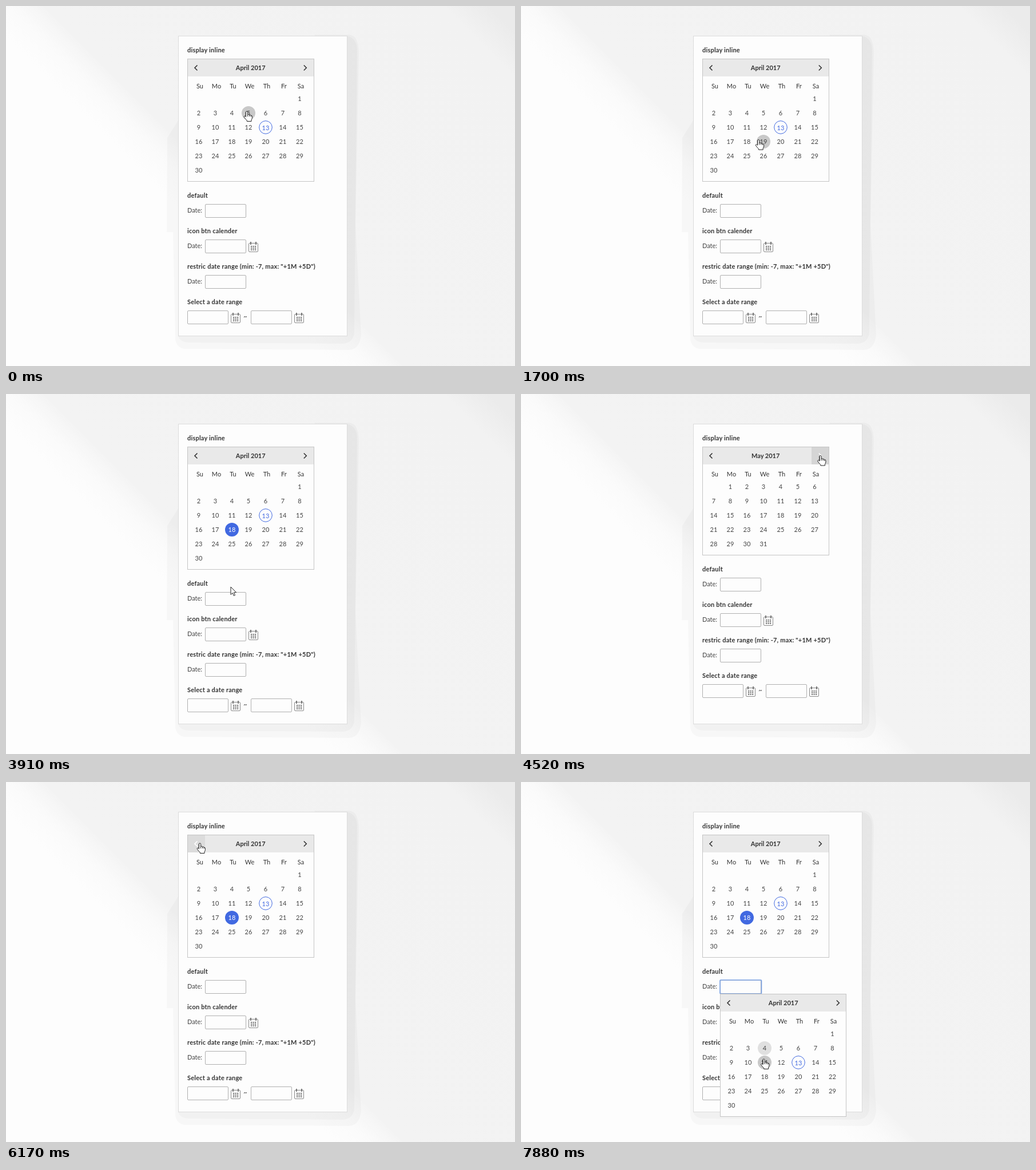
Recreate the animation shown at these times as an HTML page. Size 890 by 629 pixels, loop 8000 ms.

```html
<!DOCTYPE html>
<html lang="en">
<head>
<meta charset="utf-8">
<title>Date picker</title>
<style>
html, body { margin: 0; width: 100%; height: 100%; overflow: hidden; background: #f3f3f3; }
svg { display: block; width: 890px; height: 629px; }
text { font: 400 11px Lato, "Open Sans", sans-serif; fill: #444; white-space: pre; }
.head { font-weight: 700; fill: #333; letter-spacing: .2px; }
.title { font-weight: 700; fill: #333; text-anchor: middle; }
.mid { text-anchor: middle; }
.name { text-anchor: middle; fill: #333; }
.input { fill: #fdfdfd; stroke: #b0b0b0; }
.chev { fill: none; stroke: #333; stroke-width: 1.6; }
.cursor { fill: #fff; stroke: #222; stroke-width: 1; stroke-linejoin: round; }
</style>
</head>
<body>
<svg id="stage" viewBox="0 0 890 629" xmlns="http://www.w3.org/2000/svg">
  <defs>
    <linearGradient id="bg" gradientUnits="userSpaceOnUse" x1="0" y1="0" x2="445" y2="-445">
      <stop offset="0" stop-color="#f8f8f8"/>
      <stop offset=".075" stop-color="#f3f3f3"/>
      <stop offset=".86" stop-color="#f2f2f2"/>
      <stop offset=".95" stop-color="#ebebeb"/>
    </linearGradient>
    <linearGradient id="light" gradientUnits="userSpaceOnUse" x1="-27" y1="27" x2="35" y2="-35">
      <stop offset="0" stop-color="#fdfdfd"/>
      <stop offset="1" stop-color="#fdfdfd" stop-opacity="0"/>
    </linearGradient>
  </defs>
  <rect width="890" height="629" fill="url(#bg)"/>
  <rect width="890" height="629" fill="url(#light)"/>
  <g fill="#000">
    <path fill-opacity=".022" d="M301 200L282 230L281 395H292L296 582Q298 597 312 599L600 601Q618 600 621 575L611 380L617 80Q616 51 600 50H540V400H301Z"/>
    <path fill-opacity=".025" d="M301 560V577Q305 588 320 588L590 590Q608 588 609 570L614 75Q613 56 596 52V577Z"/>
  </g>
  <rect x="301.5" y="52.5" width="295" height="524" fill="#fdfdfd" stroke="#dcdcdc"/>
</svg>
<script>
const NS = 'http://www.w3.org/2000/svg';
const stage = document.getElementById('stage');
const LOOP = 8000, FADE = 200;
const COLS = [337, 366, 395, 424, 454, 484, 513.5];
const BLUE = '#4169e1';

function add(parent, tag, attrs, text) {
  const el = document.createElementNS(NS, tag);
  for (const key in attrs) el.setAttribute(key, attrs[key]);
  if (text !== undefined) el.textContent = text;
  parent.appendChild(el);
  return el;
}

const write = (g, x, y, cls, s) => add(g, 'text', { x, y, class: cls }, s);

function arrowButton(g, x, d) {
  const fill = add(g, 'rect', { x, y: 93, width: 30, height: 30, fill: '#c8c8c8', opacity: 0 });
  const chev = add(g, 'path', { d, class: 'chev' });
  return a => {
    fill.setAttribute('opacity', a);
    chev.style.stroke = a > 0.25 ? '#fff' : '#333';
  };
}

function calendar(parent, title, first, count, width, today) {
  const g = add(parent, 'g', {});
  const rows = Math.ceil((first + count) / 7);
  add(g, 'rect', { x: 317.5, y: 92.5, width, height: 64 + rows * 25, fill: '#fdfdfd', stroke: '#c5c5c5' });
  add(g, 'rect', { x: 318, y: 93, width: width - 1, height: 30, fill: '#e9e9e9' });
  const prev = arrowButton(g, 318, 'M334.5 103.5L330 108L334.5 112.5');
  const next = arrowButton(g, 508, 'M520.8 103.5L525.3 108L520.8 112.5');
  write(g, 427.7, 112, 'title', title);
  ['Su', 'Mo', 'Tu', 'We', 'Th', 'Fr', 'Sa'].forEach((s, i) => write(g, COLS[i] + 2, 144, 'name', s));
  const days = {};
  for (let d = 1; d <= count; d++) {
    const cell = first + d - 1, x = COLS[cell % 7], y = 162 + 25 * Math.floor(cell / 7);
    const isToday = d === today;
    const dot = add(g, 'circle', { cx: x, cy: y, r: 12, fill: '#c8c8c8', opacity: 0 });
    if (isToday) add(g, 'circle', { cx: x, cy: y, r: 11.3, fill: 'none', stroke: BLUE });
    const label = write(g, x, y + (isToday ? 5 : 4), 'mid', d);
    if (isToday) label.style.fill = BLUE;
    days[d] = { dot, label };
  }
  return { g, days, prev, next };
}

function input(g, x, y) {
  add(g, 'rect', { x: x + .5, y: y + .5, width: 71, height: 23, rx: 1.5, class: 'input' });
}

function icon(g, x, y) {
  const p = add(g, 'g', { transform: `translate(${x} ${y})`, fill: '#777' });
  add(p, 'rect', { x: .5, y: 2.5, width: 16, height: 15, rx: 1.5, fill: 'none', stroke: '#8a8a8a' });
  for (const tx of [3, 12]) add(p, 'rect', { x: tx, y: 0, width: 2, height: 5 });
  for (let i = 0; i < 9; i++) {
    add(p, 'rect', { x: 4 + 3.5 * (i % 3), y: 7 + 3 * Math.floor(i / 3), width: 2.2, height: 2 });
  }
}

const april = calendar(stage, 'April 2017', 6, 30, 221, 13);
const may = calendar(stage, 'May 2017', 1, 31, 221, 0);

const form = add(stage, 'g', {});
['default', 'icon btn calender', 'restric date range (min: -7, max: "+1M +5D")', 'Select a date range']
  .forEach((s, i) => {
    const y = 335 + 62 * i;
    write(form, 317, y, 'head', s);
    if (i === 3) return;
    write(form, 317, y + 26, '', 'Date:');
    input(form, 348, y + 11);
  });
icon(form, 424, 412);
input(form, 317, 532);
icon(form, 393, 536);
write(form, 418.5, 547, 'mid', '~');
input(form, 428, 532);
icon(form, 504, 536);
write(stage, 317, 81, 'head', 'display inline');

const focus = add(stage, 'rect', { x: 348, y: 346, width: 72.5, height: 24, rx: 1, fill: 'none', stroke: '#7ba3e6', 'stroke-width': 1.6 });
const popup = calendar(stage, 'April 2017', 6, 30, 220, 13);
popup.g.setAttribute('transform', 'translate(31 278)');

const cursors = {
  hand: 'M-1.6 1.5Q-1.6 0 0 0Q1.6 0 1.6 1.5V5.5Q4.2 4.9 4.6 6.2Q6.8 5.8 7.2 7.2Q9.4 7 9.4 9V11.5Q9.2 13.5 8 15V17.5H.3V16Q-2 14 -4.6 10.3Q-5.4 8.6 -3.9 8.2Q-2.8 8 -1.6 9.6ZM-1.6 9.6V1.5M1.6 5.5V9M4.6 6.2V9M7.2 7.2V9.5',
  arrow: 'M0 0V13.5L3.2 10.6L5.3 15.5L7.5 14.5L5.4 9.8H9.6Z',
  beam: 'M-3 -7.5H-1L0 -7L1 -7.5H3M0 -7V7M-3 7.5H-1L0 7L1 7.5H3'
};
const cursor = add(stage, 'path', { class: 'cursor' });

// Pointer legs: start, end, steps, target x, target y
const START = [421, 184];
const LEGS = [
  [80, 550, 6, 396, 213],
  [810, 985, 3, 397, 233],
  [1073, 1510, 6, 421, 233],
  [1700, 2080, 5, 392, 236],
  [2730, 3160, 6, 380, 356],
  [3910, 3910, 1, 393, 337],
  [3998, 4350, 5, 526, 105],
  [4520, 4610, 2, 521, 110],
  [5350, 5900, 7, 339, 107],
  [6350, 6890, 7, 398, 360],
  [7430, 7880, 6, 424.5, 484]
];
// Hovered days: calendar, day, from, to
const HOVERS = [
  [april, 5, -300, 200],
  [april, 11, 300, 900],
  [april, 18, 915, 1160],
  [april, 19, 1330, 1890],
  [april, 18, 1890, 2450],
  [popup, 4, 7660, 7790],
  [popup, 11, 7680, 9000]
];
const SELECT = 2450, MAY_ON = 4520, MAY_OFF = 6090, OPEN = 7160;

const clamp = v => Math.max(0, Math.min(1, v));
const pulse = (t, on, off) => Math.min(clamp((t - on) / FADE), 1 - clamp((t - off) / FADE));

function pointer(t) {
  let [x, y] = START;
  for (const [a, b, n, tx, ty] of LEGS) {
    if (t < a) break;
    const gap = n > 1 ? (b - a) / (n - 1) : 1;
    const p = Math.min(n, Math.floor((t - a) / gap + 0.02) + 1) / n;
    x += (tx - x) * p;
    y += (ty - y) * p;
  }
  return [x, y];
}

function cursorKind(x, y, t) {
  if (x > 348 && x < 420 && y > 346 && y < 370) return 'beam';
  if (t >= OPEN && y > 370) { x -= 31; y -= 278; }
  const onDay = x > 322 && x < 530 && y > 150 && y < 274;
  const onButton = y > 93 && y < 123 && (x > 318 && x < 348 || x > 508 && x < 538);
  return onDay || onButton ? 'hand' : 'arrow';
}

function draw(t) {
  const inMay = t >= MAY_ON && t < MAY_OFF;
  april.g.style.display = inMay ? 'none' : '';
  may.g.style.display = inMay ? '' : 'none';
  form.setAttribute('transform', `translate(0 ${inMay ? -25 : 0})`);

  const next = pulse(t, 4400, 5400);
  const prev = 0.4 * pulse(t, 5800, 6350);
  for (const cal of [april, may]) {
    cal.next(next);
    cal.prev(prev);
  }

  const glow = new Map();
  for (const [cal, day, on, off] of HOVERS) {
    const dot = cal.days[day].dot;
    glow.set(dot, Math.max(glow.get(dot) || 0, pulse(t, on, off)));
  }
  glow.forEach((a, dot) => dot.setAttribute('opacity', a));

  const picked = t >= SELECT, eighteen = april.days[18];
  eighteen.dot.setAttribute('fill', picked ? BLUE : '#c8c8c8');
  if (picked) eighteen.dot.setAttribute('opacity', 1);
  eighteen.label.style.fill = picked ? '#fff' : '';

  const open = clamp((t - OPEN + 60) / FADE);
  focus.style.display = popup.g.style.display = t >= OPEN ? '' : 'none';
  popup.g.setAttribute('opacity', open);

  const [x, y] = pointer(t), kind = cursorKind(x, y, t);
  cursor.setAttribute('d', cursors[kind]);
  cursor.style.fill = kind === 'beam' ? 'none' : '';
  cursor.setAttribute('transform', `translate(${x} ${y})`);
}

let begin;
function tick(now) {
  if (begin === undefined) begin = now;
  draw((now - begin) % LOOP);
  requestAnimationFrame(tick);
}
draw(0);
requestAnimationFrame(tick);
</script>
</body>
</html>
```
